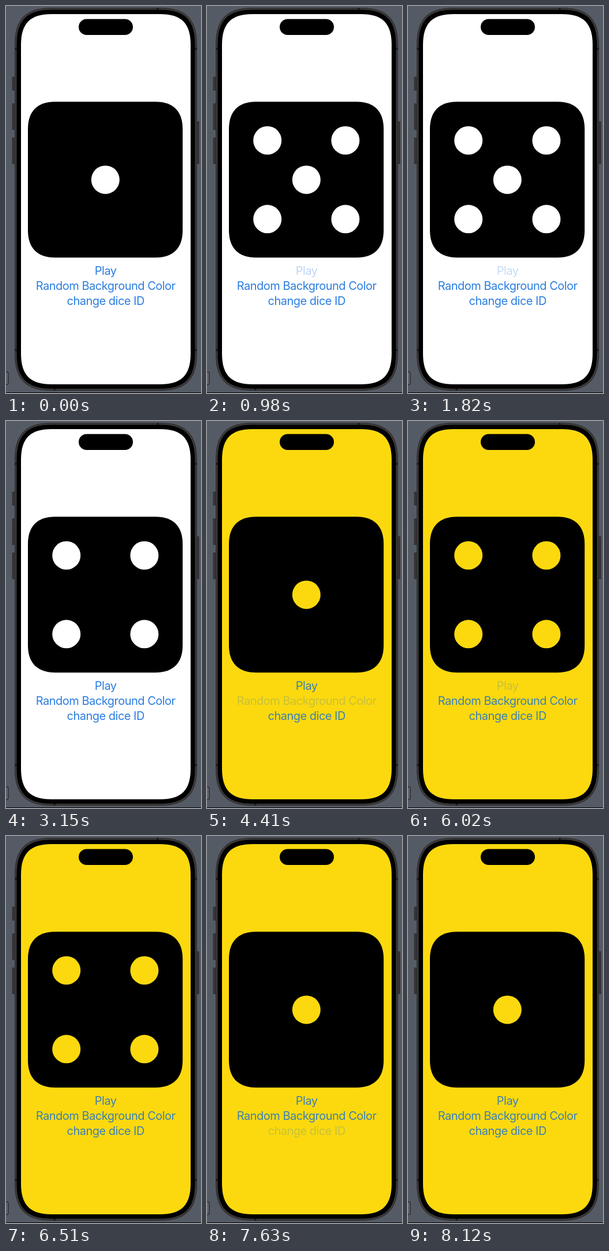
Animation, 338 px wide and 668 px high, one loop 9.66 s. Source, as an HTML page:

```html
<!DOCTYPE html>
<html lang="en">
<head>
<meta charset="utf-8">
<title>Dice</title>
<style>
  html, body { margin: 0; width: 100%; height: 100%; overflow: hidden; background: #555b65; }
  svg { display: block; }
  text {
    font: 20px Inter, "Liberation Sans", sans-serif;
    font-optical-sizing: none;
    letter-spacing: -.5px;
    text-anchor: middle;
  }
</style>
</head>
<body>
<svg width="338" height="668" viewBox="0 0 338 668">
  <path d="M0 667.5H338" stroke="#000"/>
  <rect x="-8" y="631.5" width="12" height="22" rx="3" fill="#5f646c" stroke="#302f30" stroke-width="1.5"/>
  <g fill="#353335">
    <rect x="10.5" y="122" width="6" height="24" rx="1"/>
    <rect x="10.5" y="168" width="6" height="46" rx="1"/>
    <rect x="10.5" y="227" width="6" height="46" rx="1"/>
    <rect x="329" y="199" width="6" height="74" rx="1"/>
  </g>
  <path id="rim" fill="#3b3939" stroke="#2c2a2b"/>
  <path d="M15 74h4M327 74h4M15 594h4M327 594h4M263 3v4M84 660v4" stroke="#1b1a1b" stroke-width="3"/>
  <path id="bezel"/>
  <path id="screen"/>
  <rect x="126" y="22.5" width="94" height="27.5" rx="13.75"/>
  <path id="die"/>
  <g id="pips"></g>
  <g id="labels">
    <text x="172.7" y="464">Play</text>
    <text x="172.7" y="489.7">Random Background Color</text>
    <text x="172.7" y="515.5">change dice ID</text>
  </g>
</svg>
<script>
const STEP = 70, LOOP = 9660, FADE = 490, DIM = 0.27;
const PLAY = 0, COLOR = 1, CHANGE = 2;
const $ = id => document.getElementById(id);

// Rounded box with smooth corners: e is the corner's extent, k its handle length
function smoothBox(id, x, y, r, b, e, k = 0.7) {
  const h = e * (1 - k);
  $(id).setAttribute('d', `M${x + e} ${y}H${r - e}C${r - h} ${y} ${r} ${y + h} ${r} ${y + e}
    V${b - e}C${r} ${b - h} ${r - h} ${b} ${r - e} ${b}
    H${x + e}C${x + h} ${b} ${x} ${b - h} ${x} ${b - e}
    V${y + e}C${x} ${y + h} ${x + h} ${y} ${x + e} ${y}Z`);
}
smoothBox('rim', 15.5, 3.5, 330.5, 663.5, 63);
smoothBox('bezel', 18.5, 6.5, 327.5, 660.5, 60);
smoothBox('screen', 26, 14, 320, 653, 53);
smoothBox('die', 38, 165.3, 306.2, 434.2, 47, 0.65);

// Centre pip first, then the corners
$('pips').innerHTML = [[0, 0], [-1, -1], [1, -1], [-1, 1], [1, 1]]
  .map(([x, y]) => `<circle cx="${172.3 + 67.6 * x}" cy="${299.9 + 67.9 * y}" r="24.5"/>`).join('');
const pips = [...$('pips').children], labels = [...$('labels').children];

// The button dims at `down`; the face changes and the label recovers from `up`
const taps = [
  { down: 910, up: 910, button: PLAY, face: 5 },
  { down: 1820, up: 1820, button: PLAY, face: 5 },
  { down: 2590, up: 2660, button: PLAY, face: 4 },
  { down: 4410, up: 4410, button: COLOR, face: 1 },
  { down: 6020, up: 6020, button: PLAY, face: 4 },
  { down: 7630, up: 7630, button: CHANGE, face: 1 },
];

function draw() {
  const t = Math.floor(performance.now() % LOOP / STEP) * STEP;
  const opacity = [1, 1, 1];
  let face = 1, yellow = false;
  for (const { down, up, button, face: next } of taps) {
    if (t < down) break;
    const p = Math.min(1, Math.max(0, (t - up) / FADE));
    opacity[button] = DIM + (1 - DIM) * p * p * (3 - 2 * p);
    if (t >= up) face = next;
    if (button === COLOR) yellow = true;
  }
  const paint = yellow ? '#fcd90e' : '#fff';
  $('screen').style.fill = $('pips').style.fill = paint;
  $('labels').style.fill = yellow ? '#3d80b4' : '#2b7de1';
  pips.forEach((pip, i) => pip.style.opacity = +(i ? face > 3 : face % 2 === 1));
  labels.forEach((label, i) => label.style.opacity = opacity[i]);
  requestAnimationFrame(draw);
}
draw();
</script>
</body>
</html>
```
